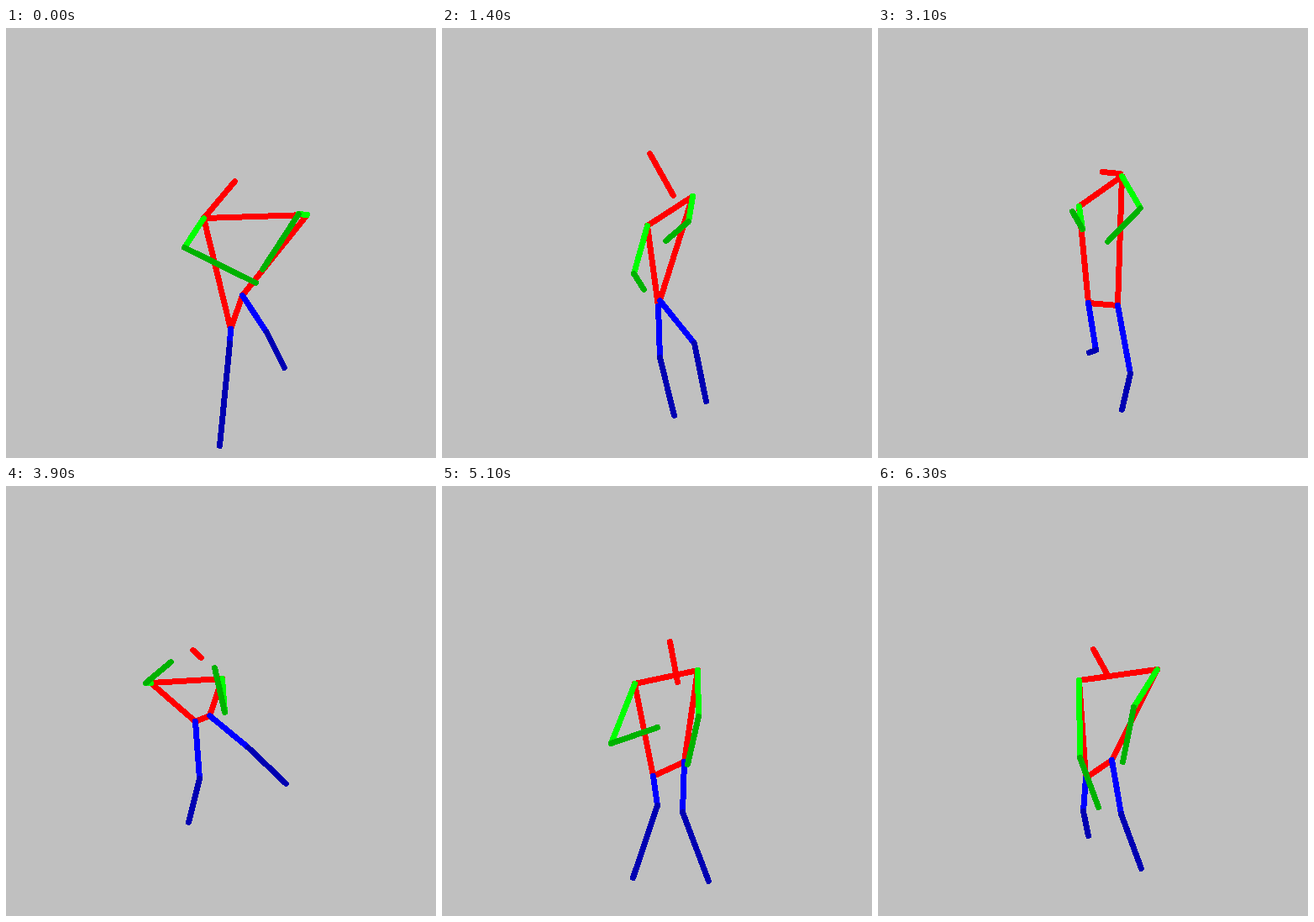
An HTML page for the animation above (6.4 s loop, 512 by 512 pixels).

```html
<!DOCTYPE html>
<html lang="en">
<head>
<meta charset="utf-8">
<title>Stick figure</title>
<style>
html, body { margin: 0; width: 100%; height: 100%; overflow: hidden; background: #c0c0c0; }
svg { display: block; width: 512px; height: 512px; }
line { stroke-width: 7; stroke-linecap: round; shape-rendering: crispEdges; }
</style>
</head>
<body>
<svg id="stage" viewBox="0 0 512 512"><g id="figure" transform="translate(.5 .5)"></g></svg>
<script>
const STEP = 100, STEPS = 64;
const RED = '#f00', LIME = '#0f0', GREEN = '#00b200', BLUE = '#00f', NAVY = '#0000b2';

// Key poses: each limb is a chain of x, y points, from the trunk outwards.
const poses = [];
const pose = (step, head, armL, armR, legL, legR) =>
  poses.push({ step, head, armL, armR, legL, legR });

pose(0, [236,225, 272,182],
  [235,226, 212,261, 297,303], [358,222, 348,221, 305,287],
  [267,358, 266,375, 254,497], [281,318, 310,362, 331,404]);
pose(14, [275,199, 247,149],
  [244,235, 228,292, 240,311], [298,200, 293,230, 266,253],
  [257,331, 259,392, 276,461], [259,324, 300,375, 314,444]);
pose(22, [280,206, 267,188],
  [226,241, 217,341, 263,323], [300,220, 299,292, 314,271],
  [259,349, 280,412, 289,460], [286,328, 308,392, 301,460]);
pose(31, [288,173, 267,171],
  [239,212, 243,239, 231,218], [290,176, 312,214, 273,254],
  [250,327, 259,383, 251,386], [285,330, 300,411, 290,454]);
pose(39, [232,204, 222,195],
  [172,234, 166,234, 196,209], [257,229, 260,269, 248,216],
  [225,280, 230,348, 217,400], [242,273, 288,311, 333,354]);
pose(51, [280,233, 271,185],
  [229,235, 201,306, 256,287], [304,219, 305,274, 292,331],
  [251,345, 256,380, 227,466], [288,328, 286,388, 317,470]);
pose(63, [272,223, 256,194],
  [239,231, 240,323, 262,382], [332,218, 304,263, 291,328],
  [247,347, 244,387, 250,416], [278,326, 289,390, 313,455]);

// Smooth curve through b and c, with a and d as neighbours.
const spline = (a, b, c, d, k) =>
  b + k / 2 * (c - a + k * (2 * a - 5 * b + 4 * c - d + k * (3 * (b - c) + d - a)));

function limbAt(name, step) {
  const last = poses.length - 1;
  const i = Math.min(last - 1, poses.findLastIndex(p => p.step <= step));
  const k = (step - poses[i].step) / (poses[i + 1].step - poses[i].step);
  const key = n => poses[Math.max(0, Math.min(last, n))][name];
  return key(i).map((b, j) => spline(key(i - 1)[j], b, key(i + 1)[j], key(i + 2)[j], k));
}

// Each bone joins two limb points: [limb, index, limb, index, colour].
const limb = (name, upper, lower) => [[name, 0, name, 1, upper], [name, 1, name, 2, lower]];
const bones = [
  ['head', 0, 'head', 1, RED],
  ['armL', 0, 'armR', 0, RED],
  ['armL', 0, 'legL', 0, RED],
  ['armR', 0, 'legR', 0, RED],
  ['legL', 0, 'legR', 0, RED],
  ...limb('legL', BLUE, NAVY),
  ...limb('legR', BLUE, NAVY),
  ...limb('armL', LIME, GREEN),
  ...limb('armR', LIME, GREEN)
];

const figure = document.getElementById('figure');
const lines = bones.map(bone => {
  const line = document.createElementNS('http://www.w3.org/2000/svg', 'line');
  line.setAttribute('stroke', bone[4]);
  return figure.appendChild(line);
});

function draw(step) {
  const limbs = {};
  for (const name of ['head', 'armL', 'armR', 'legL', 'legR']) limbs[name] = limbAt(name, step);
  bones.forEach(([from, i, to, j], n) => {
    const ends = { x1: limbs[from][2 * i], y1: limbs[from][2 * i + 1], x2: limbs[to][2 * j], y2: limbs[to][2 * j + 1] };
    for (const end in ends) lines[n].setAttribute(end, Math.round(ends[end]));
  });
}

const start = performance.now();
function tick() {
  const elapsed = Math.max(0, performance.now() - start);
  draw(Math.floor(elapsed / STEP) % STEPS);
  requestAnimationFrame(tick);
}
tick();
</script>
</body>
</html>
```
